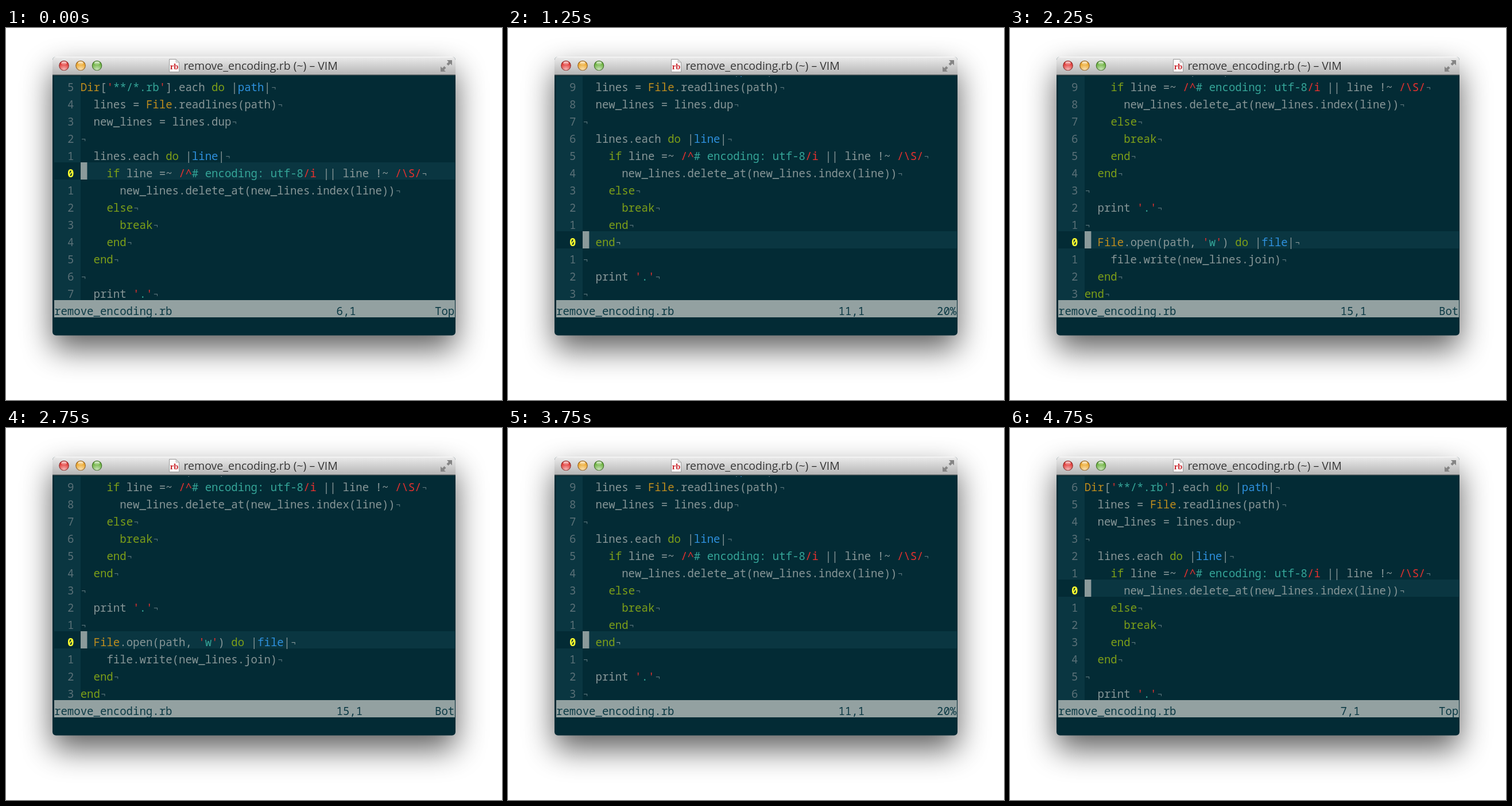
An HTML page that plays this animation: 864 px wide and 648 px high, repeating every 5 s.

```html
<!DOCTYPE html>
<html lang="en">
<head>
<meta charset="utf-8">
<title>remove_encoding.rb</title>
<style>
  html, body { margin: 0; width: 100%; height: 100%; overflow: hidden; background: #fff; }
  svg { display: block; width: 100%; height: 100%; }
  .mono text { font: 19.05px "Noto Sans Mono", "DejaVu Sans Mono", monospace; white-space: pre; fill: #879697; }
  .title { font: 19.5px "Open Sans", "Noto Sans", sans-serif; }
  .mono .num { fill: #5a7077; text-anchor: end; }
  .mono .num.now { fill: #ffff2e; font-weight: 700; }
  .mono .status text { fill: #0b3944; }
  .red { fill: #e5312f; }
  .cyan { fill: #35a598; }
  .yellow { fill: #bd8c1e; }
  .green { fill: #7d9f18; }
  .blue { fill: #2e90dd; }
  .eol { fill: #647c82; font-size: 14px; }
  .now .eol { fill: #93a1a1; }
  .now.blank .eol { fill: #0b3641; }
</style>
</head>
<body>
<svg viewBox="0 0 864 648">
  <defs>
    <filter id="blur" x="-20%" y="-30%" width="140%" height="160%"><feGaussianBlur stdDeviation="27"/></filter>
    <linearGradient id="bar" x2="0" y2="1">
      <stop stop-color="#ececec"/><stop offset="1" stop-color="#b4b4b4"/>
    </linearGradient>
    <linearGradient id="shine" x2="0" y2="1">
      <stop stop-color="#fff" stop-opacity=".9"/><stop offset="1" stop-color="#fff" stop-opacity=".1"/>
    </linearGradient>
    <radialGradient id="glow" cy=".95" r=".7">
      <stop stop-color="#fff" stop-opacity=".65"/><stop offset="1" stop-color="#fff" stop-opacity="0"/>
    </radialGradient>
    <clipPath id="frame"><rect x="81" y="50" width="702" height="485.5" rx="6"/></clipPath>
    <clipPath id="view"><rect x="84" y="84" width="698" height="390"/></clipPath>
    <g id="gloss">
      <circle r="8" fill="url(#glow)"/>
      <ellipse cy="-4.3" rx="4.8" ry="3" fill="url(#shine)"/>
    </g>
    <path id="arrow" d="M10 -10V-1L7 -4L3.5 -0.5L0.5 -3.5L4 -7L1 -10Z"/>
  </defs>

  <rect x="81" y="74" width="702" height="485" rx="6" opacity=".63" filter="url(#blur)"/>

  <g clip-path="url(#frame)">
    <rect x="81" y="50" width="702" height="486" fill="#032b35"/>
    <rect x="81" y="50" width="702" height="32" fill="url(#bar)"/>
    <rect x="81" y="50" width="702" height="1.2" fill="#f8f8f8"/>
    <rect x="81" y="81.2" width="702" height="1.3" fill="#4b5557"/>
  </g>

  <g stroke-width="1.2">
    <circle cx="101" cy="65.5" r="8.2" fill="#e33e3b" stroke="#8f2a28"/>
    <circle cx="130" cy="65.5" r="8.2" fill="#eda92f" stroke="#966322"/>
    <circle cx="158.5" cy="65.5" r="8.2" fill="#6fb442" stroke="#42702c"/>
  </g>
  <use href="#gloss" x="101" y="65.5"/>
  <use href="#gloss" x="130" y="65.5"/>
  <use href="#gloss" x="158.5" y="65.5"/>

  <path d="M284.5 54.5H296L301.5 60V76.5H284.5Z" fill="#fcfcfc" stroke="#999"/>
  <path d="M296 54.5V60H301.5Z" fill="#ddd" stroke="#aaa" stroke-width=".7"/>
  <text x="293" y="72" text-anchor="middle" font-family="Liberation Serif, serif" font-weight="700" font-size="14.5" fill="#c9252b">rb</text>

  <text class="title" x="309.5" y="74" fill="#fff" opacity=".5">remove_encoding.rb (~) – VIM</text>
  <text class="title" x="309.5" y="72.8" fill="#343434">remove_encoding.rb (~) – VIM</text>

  <g fill="#858585">
    <use href="#arrow" transform="translate(767 66)"/>
    <use href="#arrow" transform="translate(767 66) rotate(180)"/>
  </g>

  <g class="mono">
    <rect x="84" y="84" width="46" height="390" fill="#0a3641"/>
    <g id="marker">
      <rect x="84" width="46" height="30" fill="#032b35"/>
      <rect x="130" width="652" height="30" fill="#0a3641"/>
      <rect x="130" width="11.4" height="30" fill="#8b9a9b"/>
    </g>
    <g clip-path="url(#view)">
      <g id="code"></g>
      <g id="numbers"></g>
    </g>
    <rect x="84" y="474" width="698" height="30" fill="#93a1a1"/>
    <g class="status">
      <text x="84" y="500">remove_encoding.rb</text>
      <text id="position" x="575.5" y="500"></text>
      <text id="scroll" x="747" y="500"></text>
    </g>
  </g>
</svg>

<script>
const source = String.raw`Dir['**/*.rb'].each do |path|
  lines = File.readlines(path)
  new_lines = lines.dup

  lines.each do |line|
    if line =~ /^# encoding: utf-8/i || line !~ /\S/
      new_lines.delete_at(new_lines.index(line))
    else
      break
    end
  end

  print '.'

  File.open(path, 'w') do |file|
    file.write(new_lines.join)
  end
end`.split('\n');

const ROWS = 13, ROW_HEIGHT = 30, TOP = 84, BASELINE = 26;
const FIRST = 6, LAST = 16, STEP = 250, MARGIN = 9;
const SYNTAX = new RegExp([
  String.raw`(?<red>'|\/\^|\/i|\/\\S\/)`,
  String.raw`(?<cyan>\*\*\/\*\.rb|(?<=')[.w](?=')|# encoding: utf-8)`,
  String.raw`(?<yellow>Dir|File)`,
  String.raw`(?<green>\b(?:do|if|else|break|end)\b)`,
  String.raw`(?<blue>(?<=\|)\w+(?=\|))`
].join('|'), 'g');

const $ = id => document.getElementById(id);
const rowY = row => TOP + row * ROW_HEIGHT;

function addText(parent, x, row) {
  const text = document.createElementNS('http://www.w3.org/2000/svg', 'text');
  text.setAttribute('x', x);
  text.setAttribute('y', rowY(row) + BASELINE);
  return parent.appendChild(text);
}

function highlight(line) {
  return line.replace(SYNTAX, (token, ...rest) => {
    const groups = rest.at(-1);
    const color = Object.keys(groups).find(name => groups[name]);
    return `<tspan class="${color}">${token}</tspan>`;
  }) + '<tspan class="eol" dx="1.3" dy="-1">¬</tspan>';
}

const lines = source.map((line, i) => {
  const text = addText($('code'), 129.7, i);
  text.innerHTML = highlight(line);
  text.classList.toggle('blank', !line);
  return text;
});
const numbers = Array.from({ length: ROWS }, (_, row) => addText($('numbers'), 118.3, row));

function scrollLabel(top) {
  const maxTop = source.length - ROWS;
  if (top === 0) return 'Top';
  return top === maxTop ? 'Bot' : `${top / maxTop * 100}%`;
}

function draw(cursor) {
  const top = Math.max(0, Math.min(source.length - ROWS, cursor - 1 - MARGIN));
  const current = cursor - 1 - top;
  $('code').setAttribute('transform', `translate(0 ${-top * ROW_HEIGHT})`);
  $('marker').setAttribute('transform', `translate(0 ${rowY(current)})`);
  lines.forEach((line, i) => line.classList.toggle('now', i === cursor - 1));
  numbers.forEach((number, row) => {
    number.textContent = Math.abs(row - current);
    number.setAttribute('class', row === current ? 'num now' : 'num');
  });
  $('position').textContent = `${cursor},1`;
  $('scroll').textContent = scrollLabel(top);
}

const start = performance.now();
let shown;

function tick() {
  const span = LAST - FIRST;
  const step = Math.floor((performance.now() - start) / STEP) % (2 * span);
  const cursor = LAST - Math.abs(step - span);
  if (cursor !== shown) draw(shown = cursor);
  requestAnimationFrame(tick);
}
tick();
</script>
</body>
</html>
```
